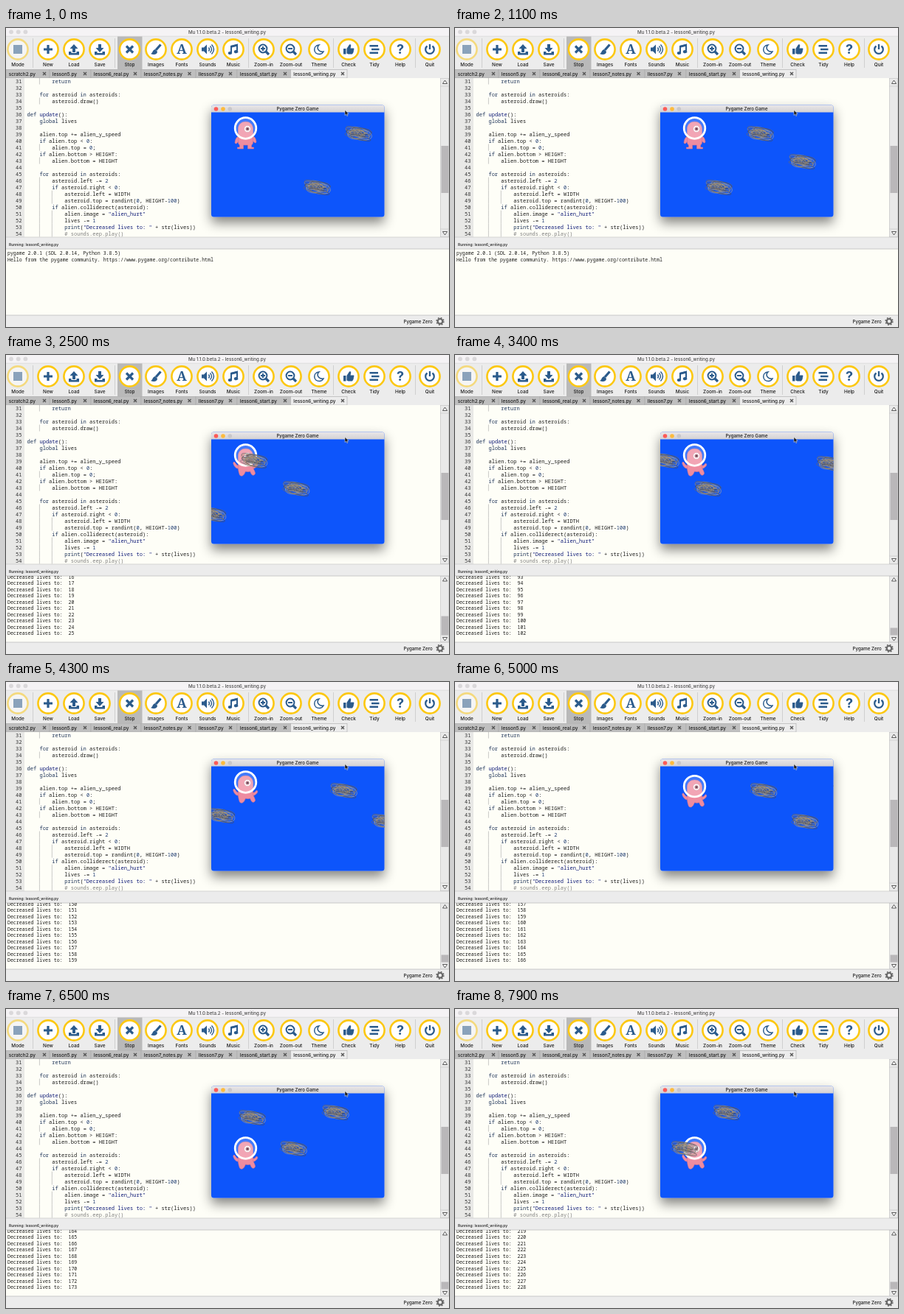
Write an HTML page that moves like this. It is 600 px wide and 406 px high and loops after 8 s.

```html
<!DOCTYPE html>
<html lang="en">
<head>
<meta charset="utf-8">
<title>Editor running a game</title>
<style>
  html, body { margin: 0; width: 100%; height: 100%; overflow: hidden; background: #ececec; }
  svg { display: block; width: 100vw; height: 100vh; }
  text { font-family: Inter, "Open Sans", sans-serif; font-size: 6.4px; font-weight: 500; fill: #1c1c1c; white-space: pre; }
  .mid { text-anchor: middle; }
  .title { font-size: 6.2px; fill: #4a4a4a; }
  .code, .out { font-family: "Noto Sans Mono", "DejaVu Sans Mono", monospace; font-weight: 400; }
  .code { font-size: 7.05px; }
  .out { font-size: 6.55px; }
  .num { fill: #333; text-anchor: end; }
  .kw { fill: #1d3358; }
  .fn, .str { fill: #101c78; }
  .dig { fill: #1d3a70; }
  .rem { fill: #808080; }
  .icon { fill: #2b5b8c; stroke: #2b5b8c; stroke-width: 0; }
  .icon .line { fill: none; stroke-width: 2; }
  .icon .fat { fill: none; stroke-width: 3.2; }
  .icon text { fill: #2b5b8c; font-weight: 700; font-size: 18px; }
</style>
</head>
<body>
<svg id="stage" viewBox="0 0 600 406" preserveAspectRatio="none">
  <defs>
    <linearGradient id="bar" x2="0" y2="1">
      <stop stop-color="#e9e7e9"/><stop offset="1" stop-color="#d3d1d3"/>
    </linearGradient>
    <filter id="shadow" x="-30%" y="-30%" width="160%" height="170%">
      <feDropShadow dx="0" dy="8" stdDeviation="8" flood-opacity=".48"/>
    </filter>
    <clipPath id="field"><path d="M278 114.600H512.500V253.500q0 3-3 3H281q-3 0-3-3z"/></clipPath>
    <clipPath id="console"><rect y="300" width="588" height="90"/></clipPath>
    <g id="rock" fill="none" stroke-width=".6"></g>
  </defs>

  <rect width="600" height="406" fill="#ececec"/>
  <rect width="600" height="11" fill="#f5f3f5"/>
  <g fill="#dad8da">
    <circle cx="7" cy="5.300" r="2.900"/>
    <circle cx="16.700" cy="5.300" r="2.900"/>
    <circle cx="26.400" cy="5.300" r="2.900"/>
  </g>
  <text class="mid title" x="299.500" y="7.800">Mu 1.1.0.beta.2 - lesson6_writing.py</text>
  <path d="M0 11.200H600" stroke="#d4d2d4" stroke-width=".6"/>
  <rect x="151" y="11.500" width="33.500" height="44.500" fill="#b9b9b9"/>
  <path d="M36.500 14V54M147.500 14V54M328.500 14V54M443.500 14V54M554.500 14V54" stroke="#cfcfcf"/>
  <g id="tools"></g>
  <g id="tabs"></g>

  <rect y="68" width="588" height="216" fill="#fefef7"/>
  <rect y="68" width="25" height="216" fill="#e8e8e6"/>
  <g id="code"></g>
  <g fill="#e9e9e9" stroke="#c2c2c2" stroke-width=".6">
    <rect x="588.300" y="68.300" width="11.400" height="215.400"/>
    <path d="M588 79H600M588 273H600"/>
  </g>
  <rect x="589.500" y="160" width="10" height="64" fill="#b9b7b9"/>
  <path d="M591.500 75.500h6l-3-4.500zM591.500 276.500h6l-3 4.500z" fill="#fff" stroke="#333" stroke-width=".8"/>

  <path d="M0 284H600" stroke="#c6c6c6" stroke-width=".7"/>
  <text x="4" y="296" style="font-size:5px">Running: lesson6_writing.py</text>
  <rect y="300" width="600" height="90" fill="#fefef7"/>
  <path d="M0 300H600M0 390H600" stroke="#bdbdbd" stroke-width=".8"/>
  <g id="output" clip-path="url(#console)"></g>
  <g id="scroll">
    <rect x="588.300" y="300.300" width="11.400" height="89.400" fill="#e9e9e9" stroke="#c2c2c2" stroke-width=".6"/>
    <path d="M591.500 307h6l-3-4.500zM591.500 383.500h6l-3 4.500z" fill="#fff" stroke="#333" stroke-width=".8"/>
    <rect id="thumb" x="589.500" width="10" fill="#b9b7b9"/>
  </g>
  <text x="538.500" y="401.200" style="font-size:6.2px">Pygame Zero</text>
  <g transform="translate(588 398.300)" fill="none" stroke="#666">
    <circle r="3.300" stroke-width="2.200"/>
    <circle r="4.900" stroke-width="1.500" stroke-dasharray="1.925"/>
  </g>

  <g filter="url(#shadow)">
    <rect x="278" y="104.500" width="234.500" height="152" rx="3.500" fill="#0f55fb"/>
    <path d="M278 114.600V108q0-3.500 3.500-3.500H509q3.500 0 3.500 3.500V114.600z" fill="url(#bar)"/>
  </g>
  <circle cx="284.500" cy="110" r="2.800" fill="#fc5b57"/>
  <circle cx="294" cy="110" r="2.800" fill="#fdbb3d"/>
  <circle cx="303.300" cy="110" r="2.800" fill="#c9c7c9"/>
  <text class="mid" x="395" y="112.300" style="font-size:6.1px">Pygame Zero Game</text>
  <g clip-path="url(#field)">
    <g id="alien">
      <g fill="#ee8ca0" stroke="#d9758b" stroke-width=".6">
        <g id="calm">
          <path d="M-9 11C-13 12-14 16-14.500 20q1.500 2 3 0L-8 16M9 11C13 11 14 15 14.500 19q-1.500 2-3 0L8 16"/>
          <path d="M-10 1C-10-12 10-12 10 1V19C10 21 9 22 8 23V26H11V28H3V23H-3V28H-11V26H-8V23C-9 22-10 21-10 19z"/>
        </g>
        <g id="hurt">
          <path d="M-9 14C-12 15-13 11-15.500 9q-2 1-1 3C-15 16-12 19-8 18M9 14C12 15 13 13 15 11q2 1 1 3C14 17 11 19 8 18"/>
          <path d="M-10 1C-10-12 10-12 10 1V17C11 20 13 22 13 25Q11 29 8 26L6 22Q3 23 0 22L-2 26Q-5 30-8 27C-9 24-10 21-10 17z"/>
        </g>
      </g>
      <circle cx="2.500" cy="1" r="4.500" fill="#fff" stroke="#cf8798" stroke-width=".6"/>
      <circle cx="2.500" cy="1" r="2.500" fill="#a4586c"/>
      <circle cx="2.700" cy="1" r="1.200" fill="#301a28"/>
      <circle r="14.300" fill="#fff" fill-opacity=".22" stroke="#fff" stroke-width="2.800"/>
    </g>
    <g id="rocks"></g>
  </g>
  <path d="M459 111.500v7l1.700-1.500 1.100 2.500 1.200-.5-1.100-2.400h2.200z" fill="#111" stroke="#fff" stroke-width=".5"/>
</svg>

<script>
const $ = id => document.getElementById(id);

function add(parent, tag, attrs = {}, text) {
  const el = document.createElementNS("http://www.w3.org/2000/svg", tag);
  for (const k in attrs) el.setAttribute(k, attrs[k]);
  if (text !== undefined) el.textContent = text;
  parent.appendChild(el);
  return el;
}

// Toolbar
const lens = '<circle class="line" cx="-1" cy="-1" r="5.400"/><path class="fat" d="M3 3L7 7"/>';
const tray = '<path d="M-7 3h3.500v2h7v-2h3.500v4.500h-14z"/>';
const tools = [
  ["Mode", 16, '<rect x="-6" y="-6" width="12" height="12"/>'],
  ["New", 57, '<path class="fat" d="M-6 0H6M0-6V6"/>'],
  ["Load", 92, '<path d="M0-7l5.500 6H2v5h-4v-5h-3.500z"/>' + tray],
  ["Save", 127, '<path d="M0 4l5.500-6H2v-5h-4v5h-3.500z"/>' + tray],
  ["Stop", 167.5, '<path class="fat" d="M-4.500-4.500l9 9M4.500-4.500l-9 9"/>'],
  ["Images", 203, '<path class="fat" d="M6.500-6.500L0 1"/><path d="M-1 0l3 3c0 4-5 5-9 3 3-1 2-5 6-6z"/>'],
  ["Fonts", 238, '<text class="mid" y="6.300" style="font-family:\'Noto Serif\',serif">A</text>'],
  ["Sounds", 273, '<path d="M-8-2.500h3l4-4v13l-4-4h-3z"/><path class="line" style="stroke-width:1.400" d="M1.500-2.500q2 2.500 0 5M3.500-4.500q4 4.500 0 9M5.500-6.500q6 6.500 0 13"/>'],
  ["Music", 308, '<path class="line" d="M-3 5V-4L5-6V3"/><path d="M-4-5l10-2.500v3L-4-2z"/><ellipse cx="-4.500" cy="5" rx="2.700" ry="2.100"/><ellipse cx="3.600" cy="3.200" rx="2.700" ry="2.100"/>'],
  ["Zoom-in", 349, lens + '<path class="line" d="M-4-1H2M-1-4V2"/>'],
  ["Zoom-out", 386, lens + '<path class="line" d="M-4-1H2"/>'],
  ["Theme", 424, '<path class="line" style="stroke-width:1.500" d="M0-6C-9-5-8 7 1 6.500Q4.500 6 6 3C-1 4-4-2 0-6z"/>'],
  ["Check", 464, '<path d="M-7-1h3.500v7.500h-3.500zM-2.500-1L1-6.500q3-1 2 3L2.500-1.500H7q1 1 0 2.500 0 4-2 5.500H-.5l-2-1z"/>'],
  ["Tidy", 499, '<path class="line" style="stroke-width:2.400" d="M-6.500-4.700H5M-4 0H6.500M-6.500 4.700H5"/>'],
  ["Help", 534, '<text class="mid" y="6.300">?</text>'],
  ["Quit", 574, '<path class="line" style="stroke-width:2.300" d="M-3.500-4.500A5.800 5.800 0 1 0 3.500-4.500M0-7V0"/>']
];
tools.forEach(([label, x, icon], i) => {
  const g = add($("tools"), "g", { transform: `translate(${x} 29)` });
  const badge = add(g, "g", { class: "icon", opacity: i ? 1 : .5 });
  add(badge, "circle", { r: 13.6, style: "fill:#fff;stroke:#fcc812;stroke-width:2.6" });
  add(badge, "g").innerHTML = icon;
  add(g, "text", { class: "mid", y: 22.7 }, label);
});

// Tabs: file name, left edge, close mark
const tabs = [
  ["scratch2.py", 0, 52], ["lesson5.py", 59, 107], ["lesson6_real.py", 115, 175],
  ["lesson7_notes.py", 183, 248.5], ["llesson7.py", 257, 304],
  ["lesson6_start.py", 313, 378], ["lesson6_writing.py", 385.5, 456]
];
tabs.forEach(([name, x, close], i) => {
  const right = i < 6 ? tabs[i + 1][1] : 462;
  add($("tabs"), "rect", { x, y: 56.3, width: right - x, height: 11.7,
    fill: i < 6 ? "#bfbfbf" : "#ececec", stroke: "#aaa", "stroke-width": .6 });
  add($("tabs"), "text", { x: x + 3.8, y: 64.6 }, name);
  add($("tabs"), "path", { d: `M${close - 2} 60l4 4m0-4l-4 4`, stroke: "#555", "stroke-width": 1.4 });
});

// Code
const source = `        return

    for asteroid in asteroids:
        asteroid.draw()

def update():
    global lives

    alien.top += alien_y_speed
    if alien.top < 0:
        alien.top = 0;
    if alien.bottom > HEIGHT:
        alien.bottom = HEIGHT

    for asteroid in asteroids:
        asteroid.left -= 2
        if asteroid.right < 0:
            asteroid.left = WIDTH
            asteroid.top = randint(0, HEIGHT-100)
        if alien.colliderect(asteroid):
            alien.image = "alien_hurt"
            lives -= 1
            print("Decreased lives to: " + str(lives))
            # sounds.eep.play()`;
const CHAR = 4.23, LEFT = 28.5;
const token = /(#.*)|(".*?")|\b(return|for|in|def|global|if|print)\b|\b(update)\b|\b(\d+)\b|[^\s\w]|\w+|\s+/g;
const kinds = ["rem", "str", "kw", "fn", "dig"];
source.split("\n").forEach((line, i) => {
  const y = 74.6 + 9 * i;
  add($("code"), "text", { class: "code num", x: 21.5, y }, 31 + i);
  const indent = line.search(/\S/);
  for (let c = 4; c < indent; c += 4) {
    const x = LEFT + c * CHAR;
    add($("code"), "path", { d: `M${x} ${y - 7}v9`, stroke: "#b5b5b5", "stroke-width": .7 });
  }
  if (indent < 0) return;
  const row = add($("code"), "text", { class: "code", x: LEFT + indent * CHAR, y });
  for (const m of line.trim().matchAll(token)) {
    const kind = kinds[m.slice(1).findIndex(Boolean)];
    add(row, "tspan", kind ? { class: kind } : {}, m[0]);
  }
});

// Scribbled asteroid
let seed = 11;
const rand = (a, b) => a + (b - a) * ((seed = seed * 16807 % 2147483647) / 2147483647);
const inks = ["#8a8a90", "#a8a296", "#66666c", "#a99068", "#93918c", "#4a4a50"];
add($("rock"), "ellipse", { rx: 12, ry: 5.5, fill: "#555", "fill-opacity": .4, transform: "rotate(8)" });
for (let i = 0; i < 22; i++) {
  const rx = rand(6, 15), ry = rand(2.5, 6.5);
  const cx = rand(rx - 19, 19 - rx);
  const room = 9 - ry - Math.abs(cx) * .25;
  add($("rock"), "ellipse", { cx, cy: rand(-room, room), rx, ry, stroke: inks[i % 6],
    transform: `rotate(${rand(-4, 20)})` });
}

// Motion
const LOOP = 8000, STEP = 100;
const drift = [[0, 0], [1100, 64], [2500, 141.5], [4300, 242.5], [5700, 321.5], [6500, 366.5], [7900, 445]];
const hits = [[2080, 0], [2500, 25], [3080, 61], [3400, 102], [4300, 159], [4400, 166],
  [6080, 166], [6200, 173], [6990, 173], [7900, 228]];
const height = [[4900, 136], [5380, 163], [5850, 163], [6320, 189]];
const WRAP = 278.5, EXIT = 256;
// start x, then y for each pass
const rocks = [[477, 143, 189], [421, 216, 147], [534, 181, 140]]
  .map(([x, ...ys]) => ({ x, ys, el: add($("rocks"), "use", { href: "#rock" }) }));

function along(points, t) {
  if (t <= points[0][0]) return points[0][1];
  for (let i = 1; i < points.length; i++) {
    const [t0, a] = points[i - 1], [t1, b] = points[i];
    if (t <= t1) return a + (b - a) * (t - t0) / (t1 - t0);
  }
  return points[points.length - 1][1];
}

const move = (el, x, y) => el.setAttribute("transform", `translate(${x} ${y})`);
const show = (el, on) => el.setAttribute("visibility", on ? "visible" : "hidden");

const intro = ["pygame 2.0.1 (SDL 2.0.14, Python 3.8.5)",
  "Hello from the pygame community. https://www.pygame.org/contribute.html"];
const rows = Array.from({ length: 10 }, () => add($("output"), "text", { class: "out", x: 2 }));

function drawConsole(count) {
  const total = count + 2, first = Math.max(0, total - 10);
  const last = total > 9 ? 380.3 : 308.3 + 8.5 * (total - 1);
  rows.forEach((row, k) => {
    const i = first + k;
    row.textContent = i >= total ? "" : intro[i] || `Decreased lives to:  ${i - 1}`;
    row.setAttribute("y", last - (total - 1 - i) * 8.5);
  });
  const size = Math.max(10, 700 / total);
  show($("scroll"), total > 9);
  $("thumb").setAttribute("height", size);
  $("thumb").setAttribute("y", 380.5 - size);
}

function draw(t) {
  const shift = along(drift, t);
  for (const { x, ys, el } of rocks) {
    const pass = Math.max(0, Math.ceil((EXIT - x + shift) / WRAP));
    move(el, x - shift + pass * WRAP, ys[Math.min(pass, 1)]);
  }
  const hurt = t > 2080 && t < 5400 || t > 6080;
  show($("hurt"), hurt);
  show($("calm"), !hurt);
  move($("alien"), 324.5, along(height, t));
  drawConsole(Math.round(along(hits, t)));
}

let start, shown = -1;
function tick(now) {
  start ??= now;
  const t = Math.floor((now - start) % LOOP / STEP) * STEP;
  if (t !== shown) draw(shown = t);
  requestAnimationFrame(tick);
}
draw(0);
requestAnimationFrame(tick);
</script>
</body>
</html>
```
